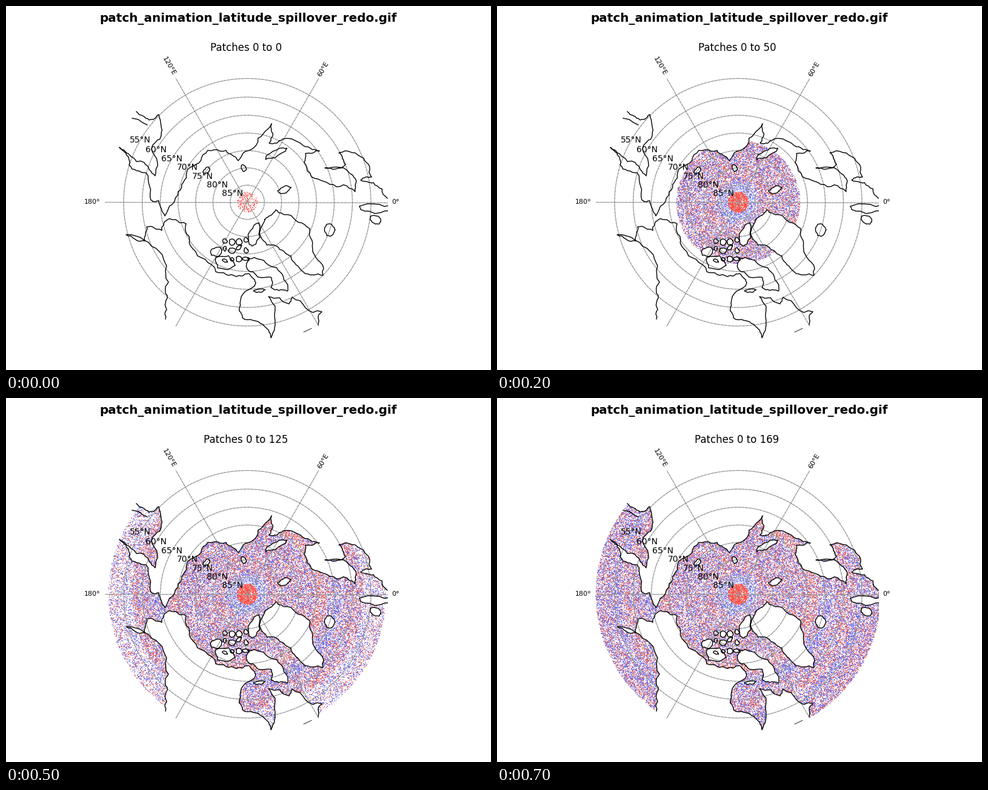
These frames come from a looping animation (800 px wide and 600 px high, 800 ms). A matplotlib script:

```python
import numpy as np
import matplotlib.pyplot as plt
from matplotlib.animation import FuncAnimation
from matplotlib.patches import Circle
from matplotlib.path import Path

plt.rcParams["font.family"] = "DejaVu Sans"
CX, CY, SCALE = 398, 323.5, 647
LEFT, RIGHT = 162.2, 629.6
REACH = [17, 70, 102, 155, 191, 229, 233, 235]  # data radius at each step
rng = np.random.default_rng(7)

# Key points of the coasts, in stage pixels; roughen() adds the detail.
EURASIA = [(215, 174), (236, 188), (252, 179), (256, 213), (240, 236), (246, 280),
           (228, 258), (187, 233), (203, 262), (231, 275), (239, 320), (252, 321),
           (262, 346), (284, 306), (298, 274), (325, 245), (363, 238), (383, 255),
           (413, 229), (438, 194), (434, 226), (457, 219), (494, 232), (517, 239),
           (494, 243), (497, 272), (534, 294), (576, 306), (572, 279), (526, 267),
           (560, 261), (549, 242), (590, 251), (603, 282), (585, 287), (606, 291),
           (629, 317)]
AMERICA = [(263, 516), (264, 485), (268, 455), (253, 405), (198, 377), (229, 387),
           (232, 364), (257, 370), (262, 355), (280, 352), (297, 359), (308, 400),
           (346, 438), (380, 446), (400, 441), (412, 456), (386, 490), (390, 514),
           (424, 525), (437, 547), (443, 513), (433, 479), (467, 491), (472, 480),
           (521, 504), (515, 525)]
GREENLAND = [(427, 352), (445, 336), (465, 344), (501, 367), (506, 405), (523, 444),
             (490, 438), (470, 412), (451, 401), (430, 394), (418, 375)]
BAFFIN = [(399, 416), (437, 429), (462, 455), (464, 470), (437, 464), (437, 447),
          (398, 434)]
# Islands as blobs: centre, width, height, tilt in degrees.
BLOBS = [(409, 379, 19, 42, 15), (361, 423, 34, 24, 15), (347, 405, 20, 15, -20),
         (533, 369, 18, 24, 0), (612, 333, 58, 15, 0), (610, 353, 20, 15, 20),
         (445, 243, 40, 10, -25), (459, 303, 21, 13, -20), (392, 267, 8, 12, -20),
         (331, 271, 14, 8, -35), (418, 469, 19, 6, -8)]


def roughen(points, levels=3):
    """Split segments at displaced midpoints to look like a coast."""
    pts = np.array(points, float)
    for _ in range(levels):
        step = np.diff(pts, axis=0)
        normal = np.column_stack([-step[:, 1], step[:, 0]])
        mid = pts[:-1] + step / 2 + normal * rng.uniform(-.17, .17, (len(step), 1))
        finer = np.empty((2 * len(pts) - 1, 2))
        finer[::2], finer[1::2] = pts, mid
        pts = finer
    return pts


def blob(x, y, w, h, tilt):
    a = np.linspace(0, 2 * np.pi, 10)[:-1]
    u, v = np.array([w * np.cos(a), h * np.sin(a)]) * rng.uniform(.4, .56, 9)
    c, s = np.cos(np.radians(tilt)), np.sin(np.radians(tilt))
    return np.column_stack([x + u * c - v * s, y + u * s + v * c])


archipelago = [(x, y, rng.uniform(5, 15), rng.uniform(5, 11), rng.uniform(-40, 40))
               for x, y in zip(np.tile(np.linspace(361, 396, 4), 3),
                               np.repeat([387, 401, 418], 4) + rng.uniform(-3, 3, 12))]
eurasia, america = roughen(EURASIA), roughen(AMERICA)
islands = [roughen(p + p[:1]) for p in (GREENLAND, BAFFIN)]
for shape in BLOBS + archipelago:
    outline = blob(*shape)
    islands.append(roughen(np.vstack([outline, outline[:1]]), 1))
coasts = [eurasia, america] + islands
land = [np.vstack([eurasia, [(700, 300), (600, 0), (150, 0), (200, 150)]]),
        np.vstack([america, [(500, 620), (250, 620)]])] + islands


def bump(r, centre, width):
    return np.exp(-((r - centre) / width) ** 2)


def ocean_dots():
    """Positions, colours and first step of the dots lying on the sea."""
    n, polar = 100000, 700
    r = np.r_[REACH[-1] * np.sqrt(rng.random(n)), 17 * np.sqrt(rng.random(polar))]
    a = rng.uniform(0, 2 * np.pi, n + polar)
    xy = np.column_stack([CX + r * np.cos(a), CY + r * np.sin(a)])

    # Outer bands are first half filled, then completed one step later.
    late = rng.random(len(r)) < .5 * ((r > 160) | (r < 17))
    first = np.minimum(np.searchsorted(REACH, r) + late, len(REACH) - 1)
    first[n:] = 1

    warm = (.46 - .42 * bump(r, 25, 10) + .16 * bump(r, 48, 12)
            + .3 * bump(r, 122, 9) - .24 * bump(r, 147, 9)
            + .14 * bump(r, 184, 7) - .2 * bump(r, 202, 7))
    red = (rng.random(len(r)) < warm) | (r < 17)
    colors = np.where(red[:, None], (.9, .33, .28, .6), (.32, .36, .92, .6))
    colors[r < 17] = 1, .3, .27, .65
    colors[(r > 17) & (r < 33), 3] = .5

    sea = ~np.any([Path(p).contains_points(xy) for p in land], axis=0)
    return xy[sea], colors[sea], first[sea]


xy, colors, first = ocean_dots()

fig = plt.figure(figsize=(8, 6), dpi=100, facecolor="white")
ax = fig.add_axes([LEFT / 800, 0, (RIGHT - LEFT) / 800, 1])
ax.set(xlim=(LEFT, RIGHT), ylim=(600, 0))
ax.axis("off")
dots = ax.scatter([], [], s=1, marker="s", linewidths=0, zorder=1)


def label(x, y, text, size, **kw):
    return ax.text(x, y, text, fontsize=size, ha="center", zorder=4, **kw)


def polar_point(radius, degrees):
    a = np.radians(degrees)
    return CX + radius * np.cos(a), CY - radius * np.sin(a)


def radius_of(lat):
    return SCALE * np.tan(np.radians(90 - lat) / 2)


for style, shade, alpha in (("-", "#b0b0b0", 1), ("--", "gray", .65)):
    look = dict(ls=style, lw=.8, alpha=alpha, zorder=2)
    for lat in range(55, 90, 5):
        ax.add_patch(Circle((CX, CY), radius_of(lat), fill=False, ec=shade, **look))
    for lon in (0, 60, 120):
        ends = [polar_point(radius_of(50), lon + turn) for turn in (180, 0)]
        ax.plot(*zip(*ends), color=shade, **look)

for coast in coasts:
    ax.plot(*coast.T, color="black", lw=1, zorder=3)
ax.plot([208, 218, 225, 233], [185, 187, 192, 196], color="black", lw=1, zorder=3)
ax.plot([491, 504], [537.5, 531.5], color="black", lw=.6, zorder=3)

label(400, 11, "patch_animation_latitude_spillover_redo.gif", 14.4,
      weight="bold", va="top")
title = label((LEFT + RIGHT) / 2, 74, "", 12)
for lat in range(55, 90, 5):
    x, y = polar_point(radius_of(lat), 150)
    label(x, y + 3.8, f"{lat}°N", 10)
label(142, 326.5, "180°", 8)
label(643, 326.5, "0°", 8)
label(268.5, 99, "120°E", 8, rotation=-60, va="center")
label(523.5, 104.5, "60°E", 8, rotation=60, va="center")


def draw(i):
    shown = first <= i
    dots.set_offsets(xy[shown])
    dots.set_facecolors(colors[shown])
    title.set_text(f"Patches 0 to {min(25 * i, 169)}")
    return dots, title


anim = FuncAnimation(fig, draw, frames=len(REACH), interval=100, repeat=True,
                     repeat_delay=0)
plt.show()
```
